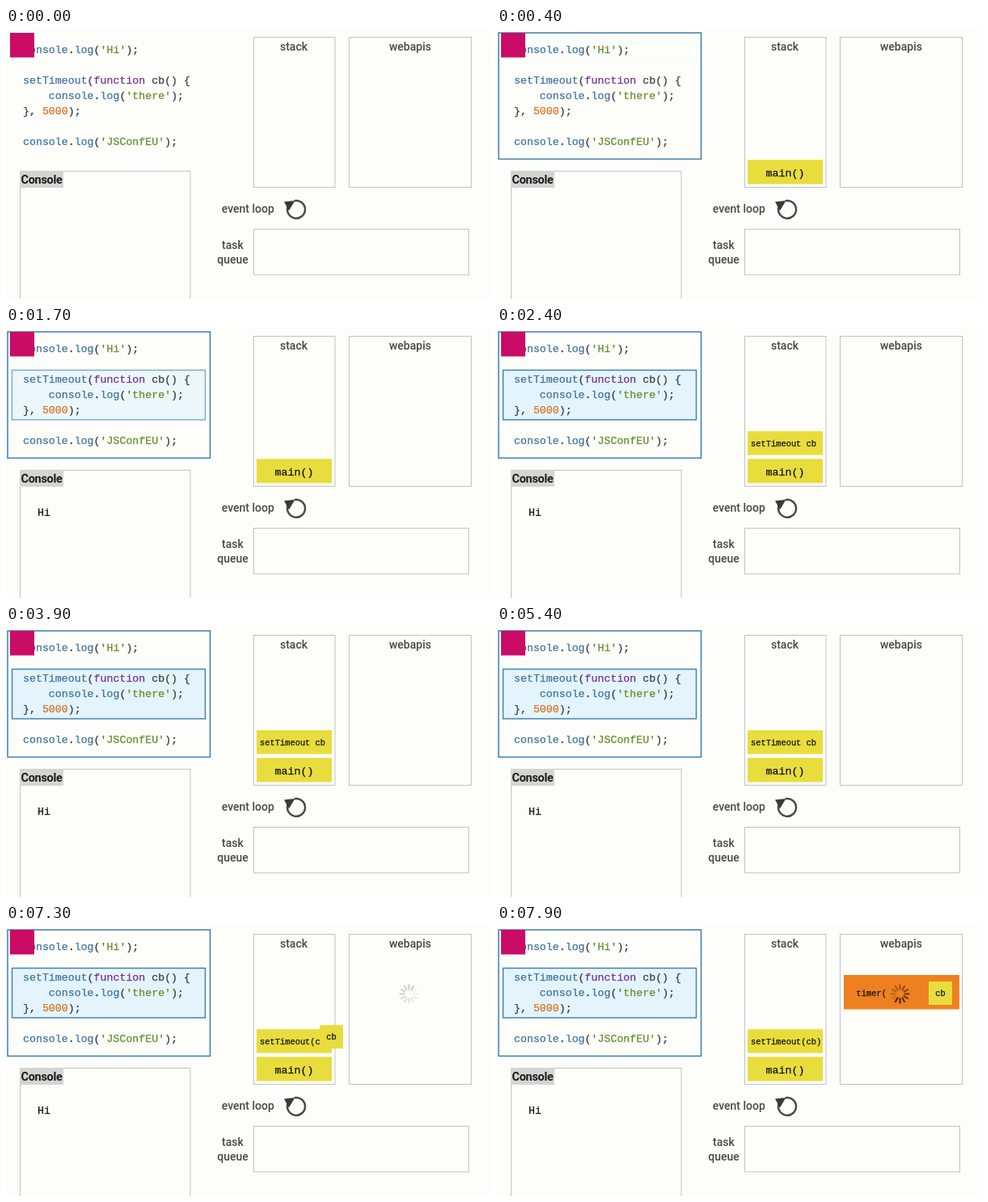
Animation, 600 px wide and 336 px high, one loop 8000 ms. Source, as an HTML page:

```html
<!DOCTYPE html>
<html lang="en">
<head>
<meta charset="utf-8">
<title>Event loop</title>
<style>
  html, body { margin: 0; width: 100%; height: 100%; overflow: hidden; background: #fdfefa; }
  svg { display: block; width: 600px; height: 336px; }
  text { white-space: pre; }
  .code { font: 13.28px "Liberation Mono", "DejaVu Sans Mono", monospace; color: #3c3c3c; }
  .code text, .code tspan, .out { fill: currentColor; stroke: currentColor; stroke-width: .25; }
  .small { font-size: 10.4px; }
  .card, .out { color: #111; }
  .card rect { fill: #e8dd3d; }
  .mid { text-anchor: middle; }
  .label { font: 500 14px Roboto, "Open Sans", sans-serif; fill: #484848; }
  .title { font-size: 14.5px; letter-spacing: -.3px; fill: #1c1c1c; }
  .box { fill: none; stroke: #c0c4c2; }
  .code .id { color: #3f719c; }
  .code .str { color: #66892a; }
  .code .num { color: #d97325; }
  .code .kw { color: #73318f; }
  .focus { fill: #def3fd; fill-opacity: .85; stroke: #3c7cb3; stroke-width: 1.4; }
</style>
</head>
<body>
<svg viewBox="0 0 600 336">
  <rect id="frame" x="2" y="6" width="250.5" height="156.5" fill="none" stroke="#3c7cb3" stroke-width="1.5"/>
  <rect id="focus1" class="focus" x="7.5" y="11.5" width="239" height="26"/>
  <rect id="focus2" class="focus" x="7.5" y="53.5" width="239" height="61.5"/>
  <g id="source" class="code"></g>
  <rect x="5" y="6" width="30" height="30.5" fill="#cb0c67"/>

  <rect class="box" x="306.5" y="11.5" width="100.5" height="186"/>
  <rect class="box" x="424.5" y="11.5" width="151" height="186"/>
  <rect class="box" x="306.5" y="249.5" width="266" height="56.5"/>
  <rect class="box" x="17.5" y="177.5" width="210.5" height="170"/>
  <rect x="17" y="177" width="54" height="21" fill="#d3d5d2"/>
  <g class="label">
    <text class="title" x="18.5" y="193" font-weight="600">Console</text>
    <text class="mid" x="356" y="28">stack</text>
    <text class="mid" x="500" y="28">webapis</text>
    <text x="266.8" y="229">event loop</text>
    <text class="mid" x="280.5" y="274">task</text>
    <text class="mid" x="280.5" y="292">queue</text>
  </g>
  <path d="M357 214.2A11 11 0 1 1 348.6 221.5" fill="none" stroke="#4a4a4a" stroke-width="2.5"/>
  <path d="M344 215.5L357.5 214L350 226.5Z" fill="#3a3a3a"/>

  <text id="hi" class="code out" x="39" y="234">Hi</text>
  <g id="main" class="card code">
    <rect x="310" y="163.5" width="93" height="30"/>
    <text class="mid" x="356.5" y="184">main()</text>
  </g>
  <g id="log" class="card code">
    <rect x="310" y="129.2" width="93" height="29.5"/>
    <text class="mid" x="356.5" y="149">log(‘<tspan class="small">Hi</tspan>’)</text>
  </g>
  <g id="timeout" class="card code small">
    <rect x="310" y="129.2" width="93" height="29.5"/>
    <text x="314" y="148">setTimeout<tspan class="paren">(</tspan>cb<tspan class="paren">)</tspan></text>
  </g>
  <g id="timer" class="code small">
    <rect x="429" y="62" width="143" height="42.5" fill="#ef8020"/>
    <text class="out" x="444.5" y="88">timer(</text>
  </g>
  <g id="spinner" stroke="#4f2709" stroke-width="2.3" stroke-linecap="round"></g>
  <g id="cb" class="card code small">
    <rect x="-14.5" y="-14.5" width="29" height="29"/>
    <text class="mid" y="3.5">cb</text>
  </g>
</svg>
<script>
const LOOP = 8000;
const $ = id => document.getElementById(id);
const clamp = v => Math.max(0, Math.min(1, v));
const make = (tag, attrs, parent) => {
  const node = document.createElementNS('http://www.w3.org/2000/svg', tag);
  for (const key in attrs) node.setAttribute(key, attrs[key]);
  return parent.appendChild(node);
};

// Code lines: baseline, then [text, class] runs
const lines = [
  [31, ['console', 'id'], ['.'], ['log', 'id'], ['('], ["'Hi'", 'str'], [');']],
  [69, ['setTimeout', 'id'], ['('], ['function', 'kw'], [' cb() {']],
  [88, ['    console', 'id'], ['.'], ['log', 'id'], ['('], ["'there'", 'str'], [');']],
  [107, ['}, '], ['5000', 'num'], [');']],
  [145, ['console', 'id'], ['.'], ['log', 'id'], ['('], ["'JSConfEU'", 'str'], [');']]
];
for (const [y, ...runs] of lines) {
  const row = make('text', { x: 21, y }, $('source'));
  for (const [text, cls = ''] of runs) make('tspan', { class: cls }, row).textContent = text;
}

const SPOKES = 12;
const spokes = Array.from({ length: SPOKES }, (_, i) =>
  make('line', { y1: -6, y2: -11, transform: `translate(498.5 85.5) rotate(${i * 360 / SPOKES})` }, $('spinner')));

// Fades: id, in start, in end, out start, out end
const fades = [
  ['frame', 100, 250],
  ['main', 150, 400],
  ['focus1', 400, 500, 1500, 1600],
  ['log', 500, 700, 1200, 1500],
  ['hi', 700, 850],
  ['focus2', 1600, 1750],
  ['timeout', 1900, 2200],
  ['spinner', 7220, 7550],
  ['timer', 7350, 7650]
];
const parens = document.querySelectorAll('.paren');

function draw(t) {
  for (const [id, a, b, c = LOOP, d = LOOP + 1] of fades)
    $(id).style.opacity = clamp((t - a) / (b - a)) * (1 - clamp((t - c) / (d - c)));

  // tspans take no opacity of their own
  const shown = clamp((t - 7000) / 150);
  parens.forEach(p => p.style.fillOpacity = p.style.strokeOpacity = shown);

  const p = clamp((t - 7235) / 340);
  const ease = (1 - Math.cos(Math.PI * p)) / 2;
  $('cb').style.opacity = clamp((t - 7200) / 40);
  $('cb').setAttribute('transform', `translate(${388 + 160.5 * ease} ${144 - 59.5 * ease})`);

  const head = Math.floor(t / 100);
  spokes.forEach((s, i) => {
    const age = ((head - i) % SPOKES + SPOKES) % SPOKES;
    s.style.opacity = 1 - .8 * age / (SPOKES - 1);
  });
}

const start = performance.now();
function tick() {
  draw((performance.now() - start) % LOOP);
  requestAnimationFrame(tick);
}
tick();
</script>
</body>
</html>
```
